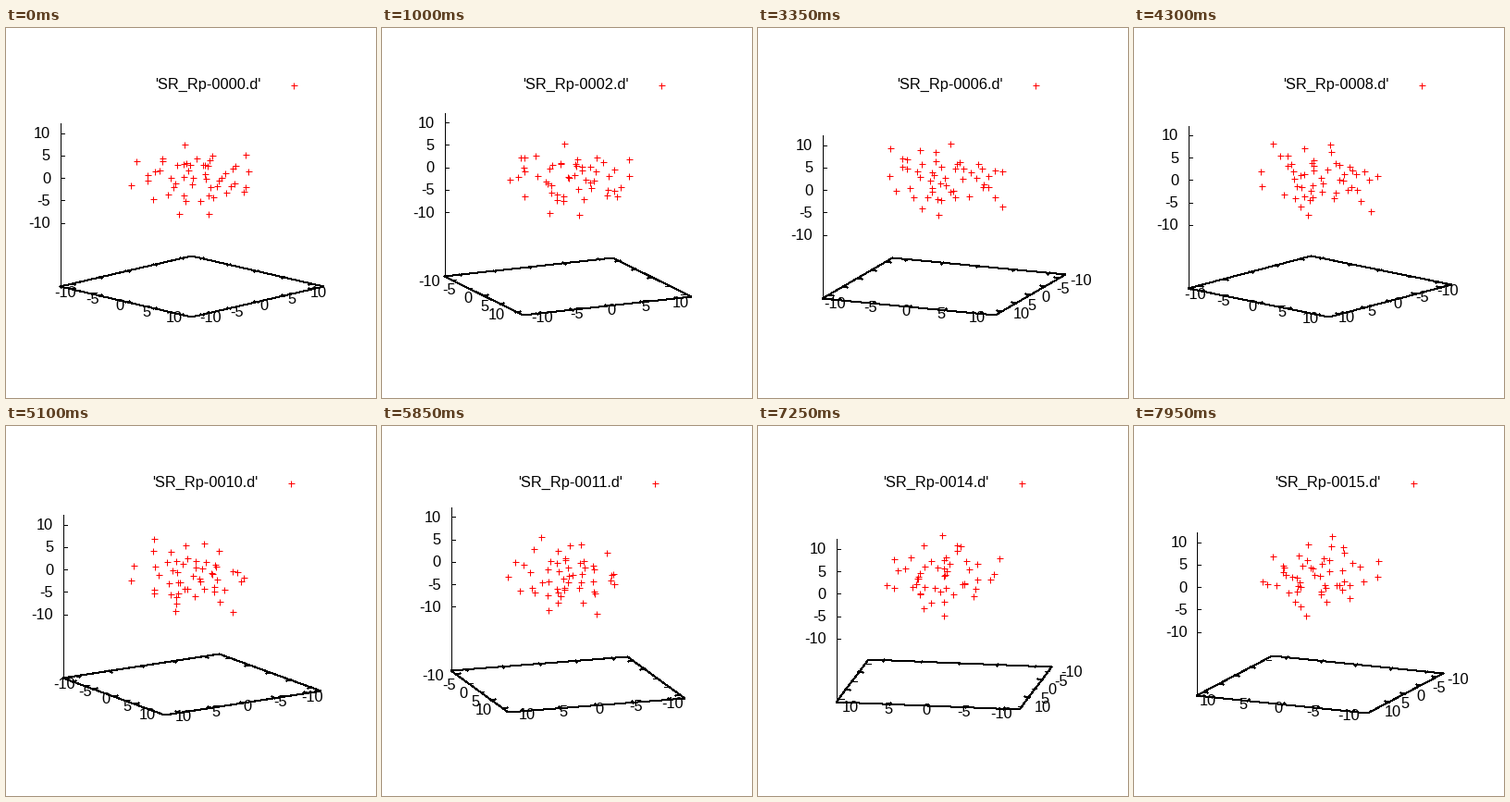
A matplotlib script that plays this animation: 400x400 px, repeating every 8 s.

```python
import numpy as np
import matplotlib.pyplot as plt
from matplotlib.animation import FuncAnimation

FRAMES, INTERVAL = 160, 50
START_ANGLE = 45            # degrees, one degree per frame
PER_FILE = 10               # frames shown for each data file
CX, CY = 200.5, 279         # centre of the floor in pixels
SX, SY = 100.76, 91.5       # pixels per half box, across and up
TILT = np.radians(75)
DEPTH = np.cos(TILT)
LIMIT = 12.15               # axis range is -LIMIT..LIMIT
Z_UNIT = 2 * SY * np.sin(TILT) / (3 * LIMIT)
CLOUD_Y = CY - 2 * LIMIT * Z_UNIT
TICKS = range(-10, 11, 5)

# Outer swarm seen from CLOUD_ANGLE: across, depth, height (pixels)
CLOUD_ANGLE = 190
OUTER = np.array([
    (-2, 59, 30), (-23, 37, 24), (13, -4, 34), (18, 31, 25), (14, 50, 15),
    (-54, 2, 18), (-37, 53, 8), (0, 41, 8), (23, 51, 4), (59, 22, 14),
    (-51, 43, -4), (-43, 7, 7), (-27, -61, 17), (-28, -41, 9), (0, -37, 17),
    (36, 33, 5), (53, 41, -7), (50, -10, -1), (35, -34, 4), (22, 43, -18),
    (20, -60, 5), (-63, -6, -8), (-54, -23, -7), (-35, -56, 1),
    (-30, 28, -15), (-26, -2, -18), (-27, -33, -12), (-11, -46, -2),
    (-4, 18, -21), (10, -40, -10), (34, -41, -4), (32, 0, -22),
    (-23, 2, -35), (-14, -59, -15), (0, 25, -34), (0, -64, -28),
])


def inner_swarm(count, radius, gap, seed):
    """Random points in a ball, kept apart from each other."""
    rng = np.random.default_rng(seed)
    pts = []
    while len(pts) < count:
        p = rng.uniform(-radius, radius, 3)
        if np.hypot.reduce(p) < radius and all(
                np.hypot.reduce(p - q) > gap for q in pts):
            pts.append(p)
    return np.array(pts) * (1, 1, 0.585)


CLOUD = np.vstack([OUTER, inner_swarm(15, 34, 15, 4)])

fig = plt.figure(figsize=(4, 4), dpi=100, facecolor="white")
ax = fig.add_axes((0, 0, 1, 1))
PX = 72 / fig.dpi
FONT = dict(family="Liberation Sans", size=16.4 * PX, color="black")


def turn(a, x, y):
    """Rotate floor coordinates; returns the across and depth parts."""
    c, s = np.cos(a), np.sin(a)
    return x * c + y * s, y * c - x * s


def floor(a, x, y):
    across, depth = turn(a, x, y)
    return CX + SX * across, CY - SY * DEPTH * depth


def line(*pts):
    xs, ys = np.round(np.array(pts)).T
    ax.plot(xs, ys, color="black", lw=PX, antialiased=False,
            solid_capstyle="projecting")


def crosses(xs, ys):
    ax.plot(np.round(xs), np.round(ys), "+", color="red", ms=7 * PX, mew=PX,
            antialiased=False)


def label(x, y, text, ha):
    ax.text(x, y + 5.9, text, ha=ha, va="baseline", **FONT)


def floor_axis(a, along_x):
    """Ticks on both parallel edges, labels on the nearer one."""
    if along_x:
        front = -1 if np.cos(a) > 0 else 1
        inward = turn(a, 0, -front)
    else:
        front = 1 if np.sin(a) > 0 else -1
        inward = turn(a, -front, 0)
    ux, uy = inward[0], -inward[1] * DEPTH

    for value in TICKS:
        v = value / LIMIT
        for side, sign in ((front, 1), (-front, -1)):
            x, y = floor(a, *((v, side) if along_x else (side, v)))
            line((x, y), (x + sign * 5 * ux, y + sign * 5 * uy))
            if side == front:
                if abs(ux) > 0.9:
                    ha, gap = ("right" if ux > 0 else "left"), 13
                else:
                    ha, gap = "center", 10
                label(x - gap * ux, y - 14 * uy, str(value), ha)


def z_axis(x, y):
    line((x, y), (x, y - 3 * LIMIT * Z_UNIT))
    for value in TICKS:
        ty = y - (value + 2 * LIMIT) * Z_UNIT
        line((x, ty), (x + 4, ty))
        label(x - 10.5, ty, str(value), "right")


def draw(n):
    ax.clear()
    ax.set(xlim=(-0.5, 399.5), ylim=(399.5, -0.5))
    ax.axis("off")
    a = np.radians(START_ANGLE + n)

    corners = [floor(a, x, y) for x, y in ((-1, -1), (1, -1), (1, 1), (-1, 1))]
    line(*corners, corners[0])
    z_axis(*min(corners))
    floor_axis(a, True)
    floor_axis(a, False)

    right = max(corners)[0]
    ax.text(right - 68, 65, f"'SR_Rp-{n // PER_FILE:04d}.d'", ha="right",
            va="baseline", **FONT)
    crosses([right - 33], [61])

    px, py, height = CLOUD.T
    across, depth = turn(a - np.radians(CLOUD_ANGLE), px, py)
    crosses(CX + across, CLOUD_Y - height - 0.235 * depth)
    return []


anim = FuncAnimation(fig, draw, frames=FRAMES, interval=INTERVAL,
                     init_func=lambda: [], repeat=True, repeat_delay=0)
plt.show()
```
